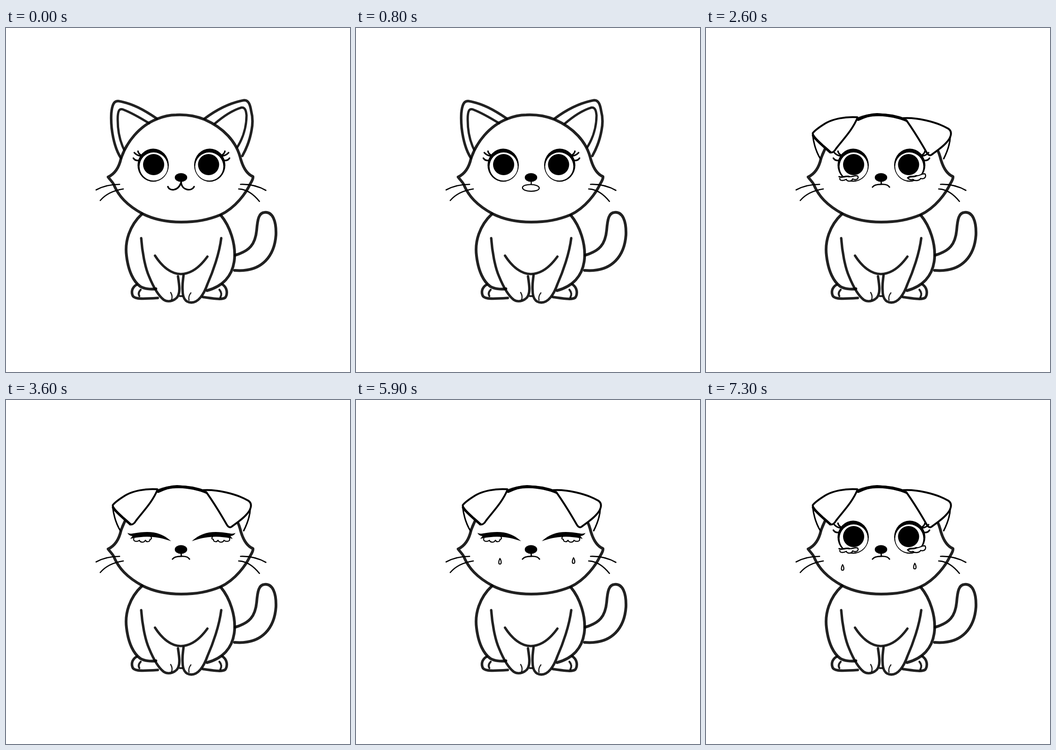
Write an HTML page that moves like this. It is 748 px wide and 748 px high and loops after 7.6 s.

```html
<!DOCTYPE html>
<html lang="en">
<head>
<meta charset="utf-8">
<title>Sad kitten</title>
<style>
  html, body { margin: 0; width: 100%; height: 100%; overflow: hidden; background: #fff; }
  svg { display: block; width: 100vw; height: 100vh; }
  .pen { fill: none; stroke: #000; stroke-linecap: round; stroke-linejoin: round; }
  .soft { stroke-opacity: .87; }
</style>
</head>
<body>
<svg viewBox="0 0 748 748">
  <defs>
    <g id="lid">
      <ellipse cx="320" cy="298.3" rx="34" ry="36"/>
      <ellipse cx="321" cy="301.2" rx="30.6" ry="30.6" fill="#fff"/>
      <path class="pen" stroke-width="3.4" d="M287 268Q288 274 295 277M279 271Q284 277 292 278M277 283Q281 289 288 288"/>
    </g>
    <g id="shut">
      <path d="M264 289Q270 292 277 290C295 287 308 286 321 288C338 291 349 298 359 307C345 302 333 299 320 298C304 296 290 298 278 300L270 302L275 296Q267 295 264 289Z"/>
    </g>
    <path id="well" class="pen" stroke-width="2.3" d="M278 301C275 308 286 309 290 305C292 310 300 311 303 305C307 311 314 307 313 303C317 303 317 300 315 297"/>
    <path id="drop" class="pen" stroke-width="2.2" d="M0 -6C-2 -2 -3 1 -2.5 4C-2 7 2 7 2.6 4C3 1 2 -3 0 -6Z"/>
  </defs>

  <g class="pen soft" stroke-width="6">
    <path d="M296 404C268 430 258 465 262 495C266 530 278 552 292 562C300 567 315 569 326 567"/>
    <path d="M467 407C488 432 499 470 497 500C494 540 470 562 437 571"/>
    <path d="M498 494C530 485 542 470 545 440C547 415 550 402 562 401C580 399 588 420 587 450C584 492 560 532 497 527"/>
    <path stroke-width="5.4" d="M294 457C296 485 302 520 311 540C320 562 330 581 343 591C354 598 371 592 375 580C379 570 376 555 374 540"/>
    <path stroke-width="5.4" d="M468 457C464 490 450 530 438 557C430 580 418 597 403 597C389 597 384 585 384 570C383 555 385 548 386 538"/>
    <path stroke-width="5.2" d="M324 495C340 520 360 535 380 535C405 535 425 515 438 497"/>
    <path stroke-width="5.6" d="M284 558C273 565 272 575 276 583C281 590 300 589 330 587M470 557C482 565 482 578 477 586C470 592 450 588 428 585"/>
    <path stroke-width="4.2" d="M293 569Q286 576 290 583M464 569Q471 577 466 586M378 583H383"/>
    <path stroke-width="2.6" d="M358 575Q363 583 360 591M402 576Q396 583 398 592"/>
    <path d="M328 198C290 213 262 248 250 284C246 302 237 317 222 324C227 331 233 336 235 342C245 365 262 385 297 404C325 418 355 422 381 422C415 422 440 417 467 406C500 390 522 358 530 341C533 335 538 329 537 323C522 317 514 300 509 280C500 248 475 218 432 199C412 191 390 188 370 189C355 189 340 193 328 198Z"/>
  </g>
  <path class="pen" stroke-width="2.7" d="M196 352Q218 340 247 340M205 375Q222 355 255 350M510 340Q540 339 565 353M506 350Q530 351 551 377"/>

  <g id="earsUp" class="pen soft" stroke-width="5.6">
    <path d="M328 197C300 178 275 164 245 159C235 158 231 166 229 185C227 220 235 260 250 283"/>
    <path d="M432 197C460 176 490 162 518 157C528 157 531 168 533 180C537 195 536 212 534 222C530 245 523 262 514 278"/>
    <path stroke-width="5" d="M311 207C290 194 270 183 254 177C246 175 244 180 243 192C242 220 247 245 257 265"/>
    <path stroke-width="5" d="M454 208C475 190 495 178 512 173C520 172 522 180 523 190C523 215 515 240 503 259"/>
  </g>
  <g id="earsDown" class="pen" stroke-width="4">
    <path stroke-width="6" d="M331 199C350 190 362 188 372 188C395 189 415 192 437 201"/>
    <path stroke-width="3.2" d="M232 232C234 252 240 270 249 285M531 238C530 255 524 270 517 284"/>
    <path fill="#fff" d="M329 194C300 192 275 199 262 206C248 214 235 224 232 229C233 239 255 257 270 270C274 272 279 269 283 262C300 240 318 222 329 196Z"/>
    <path fill="#fff" d="M429 196C455 194 500 203 527 219C534 224 534 232 529 241C520 256 500 268 490 276C486 278 483 276 480 271C468 250 455 228 436 201Z"/>
    <path stroke-width="5.4" d="M233 234C240 245 256 257 270 270"/>
  </g>

  <g id="open">
    <use href="#lid"/>
    <use href="#lid" transform="matrix(-1 0 0 1 763 0)"/>
    <circle cx="321" cy="297" r="23"/>
    <circle cx="440.5" cy="297" r="23"/>
  </g>
  <g id="openTears" class="pen" stroke-width="2.4">
    <path fill="#fff" d="M289 323C296 327 304 320 311 323C318 325 324 319 330 322C333 328 326 332 319 328C316 335 307 334 305 329C298 333 290 332 291 327"/>
    <path fill="#fff" d="M438 326C445 320 451 326 457 321C464 323 468 316 476 317C480 323 475 330 467 327C463 333 453 333 450 329C445 331 440 329 439 326"/>
    <path stroke-width="3.4" d="M290 323.5C297 326 304 321 311 323M440 325C446 321 451 325 457 321.5"/>
  </g>
  <g id="closed">
    <use href="#shut"/>
    <use href="#shut" transform="matrix(-1 0 0 1 763 0)"/>
  </g>
  <g id="closedTears">
    <use href="#well"/>
    <use href="#well" transform="matrix(-1 0 0 1 764 0)"/>
  </g>

  <ellipse cx="380.5" cy="325" rx="13.5" ry="9.6"/>
  <g class="pen" stroke-width="3">
    <path id="smile" stroke-width="3.5" d="M352 345C356 355 373 355 380 338L381 334L381 338C384 353 403 356 409 345"/>
    <path id="gasp" stroke-width="2.4" d="M381 334V340M362 347C363 338 397 338 398.500 348C398 358 362 357 362 347Z"/>
    <path id="frown" d="M381 334V339M362 346Q366 340 380 340Q395 339 399 346"/>
  </g>
  <g id="drops"><use href="#drop"/><use href="#drop"/></g>
</svg>
<script>
  const LOOP = 7600;
  const el = id => document.getElementById(id);
  const show = (id, on) => { el(id).style.display = on ? "" : "none"; };
  const blinks = [[300, 500], [3600, 3900], [5900, 6000], [6300, 7300]];
  const drops = [...el("drops").children];

  const place = (node, x, y) => node.setAttribute("transform", `translate(${x} ${y})`);

  function draw(t) {
    const shut = blinks.some(([a, b]) => t >= a && t < b);
    const droopy = t >= 1100, teary = t >= 1600, sad = t >= 2600;
    show("earsUp", !droopy);
    show("earsDown", droopy);
    show("open", !shut);
    show("closed", shut);
    show("openTears", teary && !shut);
    show("closedTears", teary && shut);
    show("smile", t < 800);
    show("gasp", t >= 800 && !sad);
    show("frown", sad);
    show("drops", t >= 4900);
    const moved = t >= 5900 && t < 7300;
    place(drops[0], moved ? 313 : 297, moved ? 350.5 : 364);
    place(drops[1], moved ? 473 : 454, moved ? 349 : 361);
  }

  const start = performance.now();
  function tick() {
    draw((performance.now() - start) % LOOP);
    requestAnimationFrame(tick);
  }
  tick();
</script>
</body>
</html>
```
